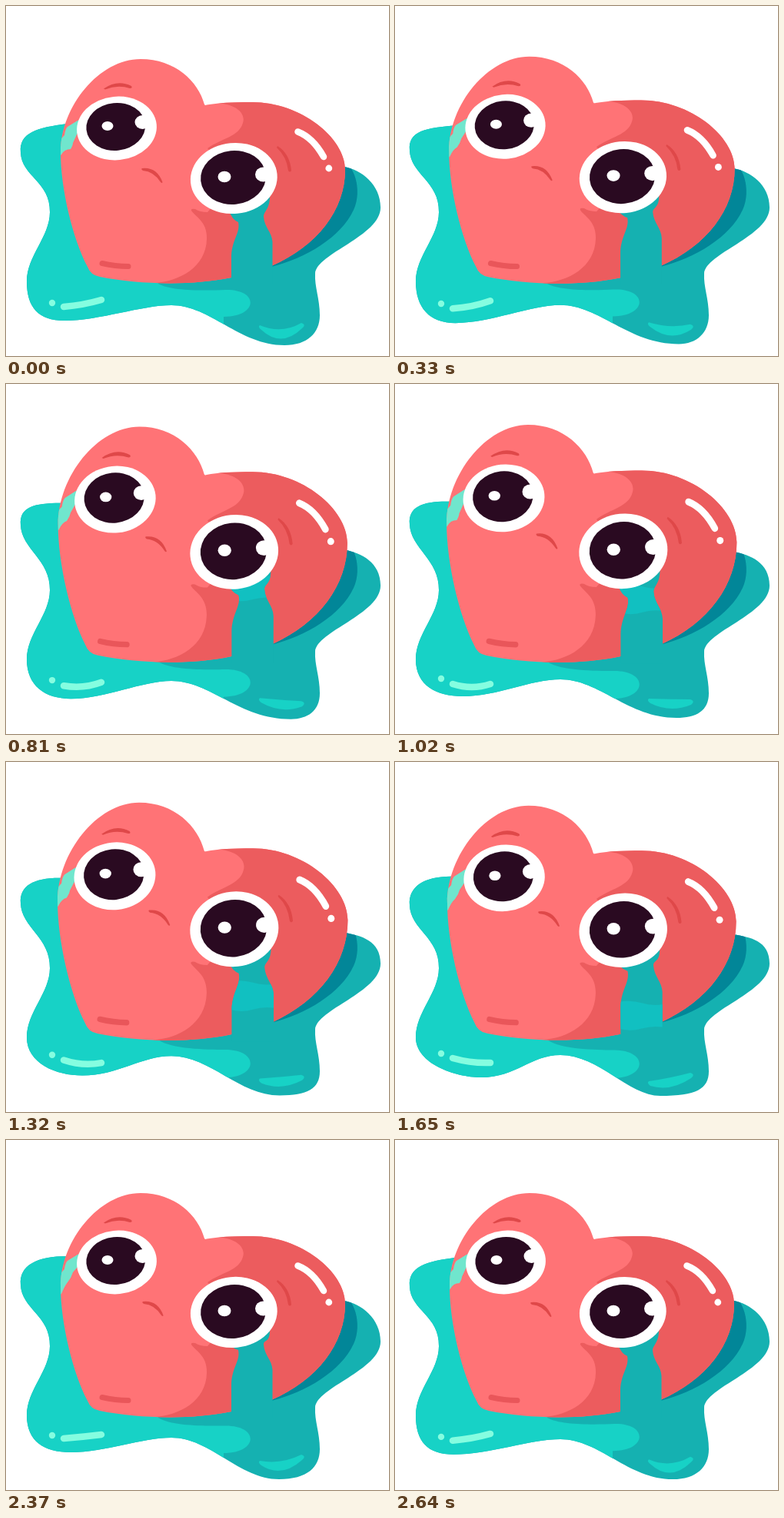
An HTML page with a canvas for the animation above (2670 ms loop, 498 px wide and 455 px high).

```html
<!DOCTYPE html>
<html lang="en">
<head>
<meta charset="utf-8">
<title>Crying heart</title>
<style>
html, body { margin: 0; width: 100%; height: 100%; overflow: hidden; background: #fff; }
canvas { display: block; width: 498px; height: 455px; }
</style>
</head>
<body>
<canvas id="stage" width="498" height="455"></canvas>
<script>
const ctx = document.getElementById('stage').getContext('2d');
const LOOP = 2670;
const TIMES = [0, 570, 1020, 1650, 1920, 2370];

// Values at TIMES, joined by a smooth periodic curve
const tracks = {
  topLeft: [153, 156, 153, 149, 148.5, 151],
  shoulder: [158, 157, 151, 147, 147, 151],
  left: [190, 185, 182, 186, 187, 188],
  bottomLeft: [409, 413, 406, 410, 407, 406],
  bottomLeftX: [76, 82, 88, 112, 114, 84],
  dip: [389, 388, 384, 381, 383, 387],
  bottomRight: [441, 438, 434, 434, 437, 441],
  bottomRightX: [362, 372, 366, 345, 346, 355],
  topRight: [213, 217, 222, 228, 222, 213],
  blob: [0, 0, 5, 7, 7, 3],
  glintA: [391, 394, 390, 385, 384, 388],
  glintMid: [389, 394, 398, 392, 389, 386],
  glintB: [382, 385, 390, 391, 388, 383],
  glintDot: [386, 387, 383, 379, 380, 384],
  shineA: [417, 411, 411, 417, 420, 419],
  shineMid: [433, 420, 416, 417, 420, 428],
  shineB: [416, 418, 414, 408, 409, 413],
  knee: [1, 0, 1, 0.2, 1, 0],
  frown: [0, 0.35, 1, 1.25, 0.75, 0.12]
};

const HEART = 'M258 128C250 98 220 69 175 69C121 69 71 131 71 190' +
  'C71 238 87 303 106 339Q110 350 122 352C172 362 240 364 293 353L345 338' +
  'C405 312 441 265 441 213C441 171 383 125 320 125C295 125 275 126 261 128.5Q259 129.5 258 128Z';
const HEART_SHADE = 'M272 126C300 127 312 140 308 152C303 170 280 172 262 185L300 225L262 268' +
  'Q252 268 246 264Q240 263 241 266C246 274 262 280 261 303C260 340 225 358 193 360' +
  'L200 380H460V100H272Z';

const color = {
  bright: '#17d2c6', deep: '#15b1b1', shadow: '#028698', glint: '#85fde0',
  mint: '#70e6cd', wave: '#11c0c1', pink: '#ff7376', red: '#ec5c5e',
  line: '#df4849', cheek: '#e9565a', pupil: '#2a0a21'
};

function sample(values, t) {
  const n = TIMES.length;
  const time = i => TIMES[(i + n) % n] + LOOP * Math.floor(i / n);
  const value = i => values[(i + n) % n];
  const slope = i => (value(i + 1) - value(i - 1)) / (time(i + 1) - time(i - 1));
  let i = 0;
  while (i < n - 1 && t >= TIMES[i + 1]) i++;
  const span = time(i + 1) - time(i);
  const p = (t - time(i)) / span, q = 1 - p;
  return value(i) * (1 + 2 * p) * q * q + slope(i) * span * p * q * q +
    value(i + 1) * p * p * (3 - 2 * p) - slope(i + 1) * span * p * p * q;
}

const clamp = v => Math.max(0, Math.min(1, v));
const ease = p => (1 - Math.cos(Math.PI * clamp(p))) / 2;
const swell = t => ease(t / 1110) - ease((t - 1290) / 1110);

function fill(d, style) {
  ctx.fillStyle = style;
  ctx.fill(new Path2D(d));
}

function stroke(d, style, width) {
  ctx.strokeStyle = style;
  ctx.lineWidth = width;
  ctx.lineCap = 'round';
  ctx.stroke(new Path2D(d));
}

function oval(x, y, rx, ry, style, turn = 0) {
  ctx.fillStyle = style;
  ctx.beginPath();
  ctx.ellipse(x, y, rx, ry, turn, 0, Math.PI * 2);
  ctx.fill();
}

function clipped(d, draw) {
  ctx.save();
  ctx.clip(new Path2D(d));
  draw();
  ctx.restore();
}

function drawPuddle(v) {
  const b = v.blob, x = v.bottomLeftX;
  const puddle = `M110 ${v.topLeft}H80C40 ${v.shoulder} 17 ${v.left - 25} 19 ${v.left}
    C20 ${v.left + 32} 58 228 57 268C57 300 27 325 27 358
    C27 392 ${x - 34} ${v.bottomLeft} ${x} ${v.bottomLeft}
    C${x + 46} ${v.bottomLeft} 176 ${v.dip} 215 ${v.dip}
    C266 ${v.dip} 303 ${v.bottomRight} ${v.bottomRightX} ${v.bottomRight}
    C392 ${v.bottomRight} 408 425 408 402C408 380 401 365 402 348
    C403 322 487 299 487 262C487 232 462 ${v.topRight} 440 ${v.topRight - 4}L400 200Z`;
  fill(puddle, color.deep);
  clipped(puddle, () => {
    fill(`M0 100H198V361C215 ${371 + b * 0.4} 260 ${370 + b * 0.6} 285 ${369 + b * 0.8}
      C330 ${368 + b} 328 ${404 + b} 283 ${404 + b}V455H0Z`, color.bright);
    fill('M436 200C452 205 464 238 452 265C436 300 390 328 345 339L330 300Z', color.shadow);
  });
  oval(60, v.glintDot, 4.2, 4.2, color.glint);
  stroke(`M75 ${v.glintA}Q100 ${v.glintMid} 124 ${v.glintB}`, color.glint, 8.5);
  fill(`M330 ${v.shineA - 2}Q358 ${v.shineMid - 6} 384 ${v.shineB - 4}Q391 ${v.shineB - 2} 385 ${v.shineB + 3}
    Q358 ${v.shineMid + 12} 332 ${v.shineA + 4}Q327 ${v.shineA} 330 ${v.shineA - 2}Z`, color.bright);
}

function drawTears(v, t) {
  const k = v.knee;
  clipped(HEART, () => fill(`M105 145L93 149L80 157Q77 160 76 168L60 185V206L72 ${200 - 7 * k}
    Q76 ${190 - 4 * k} ${80 + 4 * k} ${185 + k}Q${85 + 2 * k} ${179 + 2 * k} 87 ${172 + 6 * k}
    L93 165L110 160Z`, color.mint));

  const y = 275 + 8 * k;
  const tear = `M320 240L290 266Q294 ${y - 5} 302 ${y - 2}C305 ${y + 12} 294 ${y + 20} 293 ${y + 42}
    V362H346.5V${y + 24}C346 ${y + 11} 336 ${y + 5} 335 ${y - 9}C335 ${y - 16} 343 264 343 248Z`;
  fill(tear, color.deep);

  const top = 267 + 0.075 * (t - 1020);
  const bottom = Math.min(346, 299 + 0.078 * (t - 1020));
  const alpha = clamp((t - 500) / 100) * clamp((1870 - t) / 170);
  if (!alpha || bottom <= top) return;
  clipped(tear, () => {
    ctx.globalAlpha = alpha;
    fill(`M285 ${top}Q303 ${top - 5} 320 ${top}T355 ${top}V${bottom}
      Q338 ${bottom - 5} 320 ${bottom}T285 ${bottom - 2}Z`, color.wave);
  });
}

function drawFace(frown) {
  fill('M127 107.5Q145 95 163 104Q165 107 161 107Q145 102 129 108.5Z', color.line);
  fill('M353 182Q369 192 371 214Q369 217 367 214Q365 196 352 184Z', color.line);
  ctx.save();
  ctx.translate(9 * frown, -8.5 * frown);
  fill('M177 211Q196 209 203.5 229Q203 231 201 229Q192 215 178 214Q175 212 177 211Z', color.line);
  ctx.restore();
  stroke('M125 334.5Q142 338.5 159 338.5', color.cheek, 7);

  oval(144, 159, 52, 41.3, '#fff', -0.1);
  oval(142.8, 157, 38.5, 31, color.pupil, -0.1);
  oval(132, 156, 7.5, 6, '#fff');
  oval(177.5, 151, 10, 9, '#fff');

  oval(296.3, 224, 56.5, 46, '#fff', -0.1);
  oval(295.5, 223, 42.5, 35, color.pupil, -0.1);
  oval(284, 222, 8.5, 7.3, '#fff');
  oval(334.5, 219, 10.5, 9.5, '#fff');

  stroke('M379.5 163.5Q399 171 413 196', '#fff', 8.5);
  oval(419.8, 211, 4.4, 4.4, '#fff');
}

function render(t) {
  const v = {};
  for (const name in tracks) v[name] = sample(tracks[name], t);
  const s = swell(t);

  ctx.fillStyle = '#fff';
  ctx.fillRect(0, 0, 498, 455);
  drawPuddle(v);

  ctx.save();
  ctx.translate(270, 335);
  ctx.scale(1 + 0.02 * s, 1 + 0.061 * s);
  ctx.translate(-270, -335);
  fill(HEART, color.pink);
  clipped(HEART, () => fill(HEART_SHADE, color.red));
  drawTears(v, t);
  drawFace(v.frown);
  ctx.restore();
}

const start = performance.now();
function tick(now) {
  render(Math.max(0, now - start) % LOOP);
  requestAnimationFrame(tick);
}
render(0);
requestAnimationFrame(tick);
</script>
</body>
</html>
```
